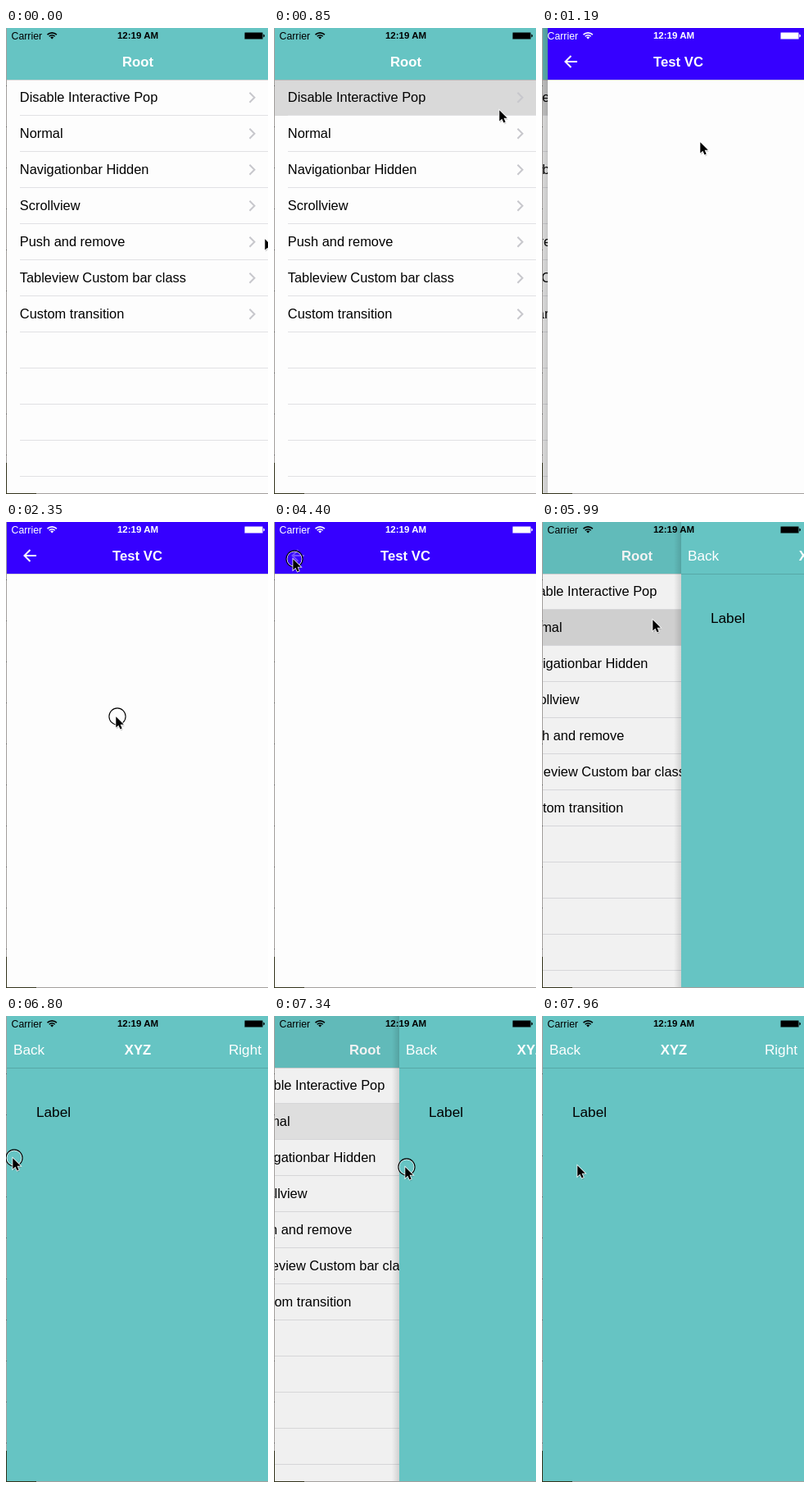
Recreate the animation shown at these times as an HTML page. Size 320 by 568 pixels, loop 8 s.

```html
<!DOCTYPE html>
<html lang="en">
<head>
<meta charset="utf-8">
<title>Navigation transitions</title>
<style>
html, body { margin: 0; width: 100%; height: 100%; overflow: hidden; background: #fff; }
svg { display: block; width: 320px; height: 568px; }
text { font: 16.4px "Liberation Sans", Arial, sans-serif; }
.title { font-size: 16.7px; font-weight: bold; fill: #fff; text-anchor: middle; }
.item { font-size: 17.2px; fill: #fff; }
.label { font-size: 17.2px; }
.carrier { font-size: 12.3px; }
.clock { font-size: 11.5px; font-weight: bold; text-anchor: middle; }
.teal { fill: #66c4c3; }
.page { fill: #fdfdfd; }
.hairline { fill-opacity: .15; }
</style>
</head>
<body>
<svg viewBox="0 0 320 568">
  <defs>
    <clipPath id="window"><path d="M1 0H320V567H1z"/></clipPath>
    <linearGradient id="shade">
      <stop offset="0" stop-opacity="0"/>
      <stop offset="1" stop-opacity=".13"/>
    </linearGradient>
  </defs>

  <path fill="#a39f9d" d="M0 0H1V568H0zM0 567H320V568H0z"/>
  <path stroke="#666" stroke-dasharray="1 49" d="M.5 70V530"/>
  <path fill="#33331c" d="M0 530H1V567H37V568H0z"/>

  <g clip-path="url(#window)">
    <g id="root">
      <path class="page" d="M1 0H420V568H1z"/>
      <path class="teal" d="M1 0H420V63H1z"/>
      <text class="title" x="161" y="47">Root</text>
      <rect id="glow" x="1" width="319" height="44" fill="#d9d9d9"/>
      <path class="hairline" d="M1 63H420V64H1z"/>
      <g id="rows"></g>
    </g>
    <path id="dim" d="M0 0H320V568H0z"/>

    <g id="top">
      <path fill="url(#shade)" d="M-8 0H1V568H-8z"/>
      <g id="test">
        <path class="page" d="M1 0H320V568H1z"/>
        <path fill="#3600ff" d="M1 0H320V63H1z"/>
        <path id="arrow" d="M37 41H22.5M29.5 34L22.5 41L29.5 48" fill="none" stroke="#fff" stroke-width="2"/>
        <text class="title" x="160.5" y="47">Test VC</text>
      </g>
      <g id="xyz">
        <path class="teal" d="M1 0H320V568H1z"/>
        <text class="item" x="9" y="47">Back</text>
        <text class="title" x="161" y="47">XYZ</text>
        <text class="item" x="312" y="47" text-anchor="end">Right</text>
        <text class="label" x="37" y="123">Label</text>
      </g>
      <path class="hairline" d="M1 63H320V64H1z"/>
    </g>

    <g id="status">
      <text class="carrier" x="6.5" y="13.7">Carrier</text>
      <path fill="none" stroke="currentColor" stroke-width="1.6"
        d="M50.5 8.2A8.2 8.2 0 0 1 61.9 8.2M52.7 10.3A5 5 0 0 1 59.7 10.3"/>
      <path d="M56.2 13.6L54.2 11.4A2.8 2.8 0 0 1 58.2 11.4z"/>
      <text class="clock" x="161" y="13">12:19 AM</text>
      <rect x="291" y="5" width="23" height="9" rx="1.5" opacity=".5"/>
      <path d="M292 6H313V13H292zM314.3 7.5Q316 8 316 9.5T314.3 11.5z"/>
    </g>
  </g>

  <g id="pointer">
    <g id="press" fill="none">
      <circle cx="2" r="9.2" stroke="#fff"/>
      <circle cx="2" r="10.1" stroke="#000" stroke-width="1.1"/>
    </g>
    <path d="M1 2V15.5l3.3-2.8 2.2 4.6 2.2-1-2.1-4.6h4.4z" opacity=".2"/>
    <path d="M.3 .3V13.6l3.1-2.9 2.2 4.7 2.1-.9-2.1-4.7h4.2z" stroke="#fff" paint-order="stroke" stroke-width="1.5"/>
  </g>
</svg>
<script>
const LOOP = 8000, WIDTH = 320, PARALLAX = 96, ROW = 44, BAR = 63;
const ITEMS = ['Disable Interactive Pop', 'Normal', 'Navigationbar Hidden', 'Scrollview',
  'Push and remove', 'Tableview Custom bar class', 'Custom transition'];

const $ = id => document.getElementById(id);
const show = (id, on) => $(id).setAttribute('visibility', on ? 'visible' : 'hidden');
const shift = (id, x, y = 0) => $(id).setAttribute('transform', `translate(${Math.round(x)} ${Math.round(y)})`);

// a place where the pointer rests, and whether it taps there or starts a drag
const stop = (arrive, leave, x, y, act) => ({ arrive, leave, x, y, act });

const firstRow = stop(720, 850, 275, 100, 'tap');
const back = stop(4230, 4570, 23, 45, 'tap');
const secondRow = stop(5780, 5900, 141, 116, 'tap');
const edge = stop(6600, 6800, 8, 173, 'drag');
const end = stop(7540, LOOP, 43, 182);
const STOPS = [
  stop(0, 90, 316, 257),
  firstRow,
  stop(1780, 2060, 5, 228, 'drag'),
  stop(2380, 2500, 137, 237),
  stop(2880, 3200, 5, 231, 'drag'),
  stop(3540, 3580, 208, 248),
  back, secondRow, edge,
  stop(7200, 7220, 215, 185, 'drag'),
  end
];

$('rows').innerHTML = Array.from({ length: 11 }, (_, i) => {
  const y = BAR + ROW * i;
  const line = `<path fill="#e1e1e4" d="M17 ${y + 43}H320v1H17z"/>`;
  return line + (ITEMS[i] ? `<text x="16.8" y="${y + 27}">${ITEMS[i]}</text>
    <path d="M297.5 ${y + 15.7}l6 6l-6 6" fill="none" stroke="#c7c7cc" stroke-width="2"/>` : '');
}).join('');

// critically damped spring from 0 to 1
function spring(ms) {
  const s = Math.max(0, ms) * 0.0175;
  return 1 - (1 + s) * Math.exp(-s);
}

function pointer(t) {
  const i = STOPS.findLastIndex(s => t >= s.arrive);
  const from = STOPS[i], to = STOPS[i + 1] || from;
  const moving = t >= from.leave;
  const u = moving ? (t - from.leave) / (to.arrive - from.leave) : 0;
  const k = u * u * (3 - 2 * u);
  return {
    x: from.x + (to.x - from.x) * k,
    y: from.y + (to.y - from.y) * k,
    pressed: from.act === (moving ? 'drag' : 'tap')
  };
}

const dragged = t => Math.max(0, pointer(t).x - edge.x) / WIDTH;

// 0: upper page covers the list, 1: it is off to the right
function openness(t) {
  if (t < back.leave) return 1 - spring(t - firstRow.leave);
  if (t < secondRow.leave) return spring(t - back.leave);
  if (t < edge.leave) return 1 - spring(t - secondRow.leave);
  if (t < end.arrive) return dragged(t);
  return dragged(end.arrive) * (1 - spring(t - end.arrive));
}

// highlight of the chosen row: on at the tap, fading as the list returns
function glow(t, row) {
  if (t < row.arrive + 50) return 0;
  const returning = row === firstRow ? t > back.leave : t > edge.leave;
  return returning ? 1 - openness(t) : 1;
}

function draw(t) {
  const open = openness(t), { x, y, pressed } = pointer(t);
  const row = t < secondRow.arrive ? firstRow : secondRow;
  const onTest = row === firstRow;
  shift('top', open * WIDTH);
  shift('root', (open - 1) * PARALLAX);
  show('top', open < 0.999);
  show('test', onTest && open < 0.999);
  show('xyz', !onTest && open < 0.999);
  $('dim').setAttribute('opacity', 0.1 * (1 - open));
  $('glow').setAttribute('y', onTest ? BAR : BAR + ROW);
  $('glow').setAttribute('opacity', glow(t, row));
  $('arrow').setAttribute('opacity', t > back.arrive && t < back.leave ? 0.3 : 1);
  const light = t > firstRow.leave + 40 && t < back.leave + 40;
  $('status').style.fill = $('status').style.color = light ? '#fff' : '#000';
  shift('pointer', x, y);
  show('press', pressed);
}

const start = performance.now();
function tick() {
  draw((performance.now() - start) % LOOP);
  requestAnimationFrame(tick);
}
tick();
</script>
</body>
</html>
```
